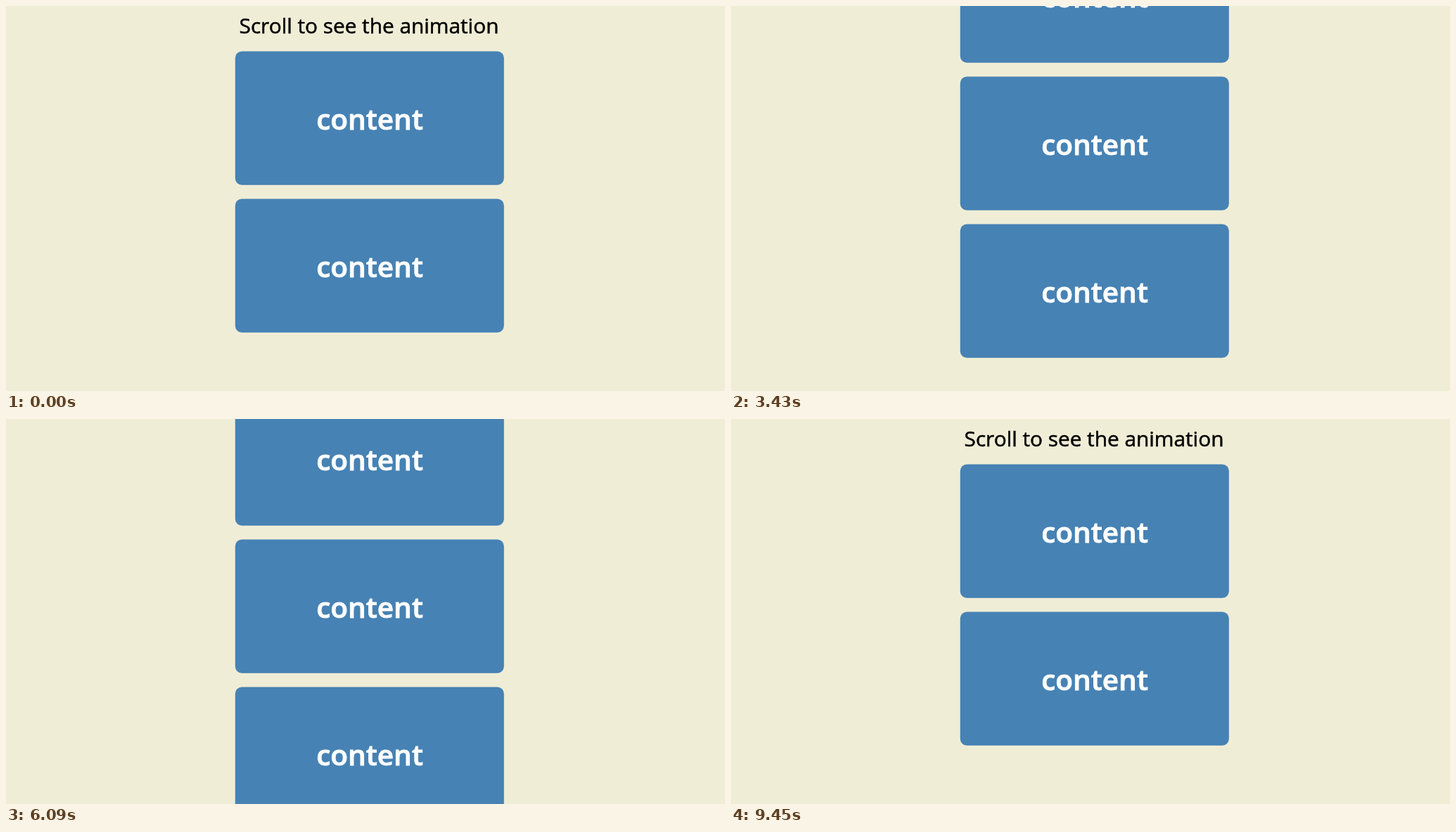
These frames come from a looping animation (1022 by 548 pixels, 9730 ms). An HTML page:

```html
<!DOCTYPE html>
<html lang="en">
<head>
<meta charset="utf-8">
<title>Scroll animation</title>
<style>
  html, body { margin: 0; width: 100%; height: 100%; overflow: hidden; background: #efedd6; }
  svg { display: block; width: 1022px; height: 548px; }
  text { font-family: "Open Sans", "Noto Sans", sans-serif; text-anchor: middle; }
  .title { font-size: 29.8px; fill: #000; stroke: #000; stroke-width: .5px; }
  .label { font-size: 40.6px; font-weight: 600; fill: #fff; stroke: #fff; stroke-width: .9px; }
  rect { fill: #4682b4; }
</style>
</head>
<body>
<svg viewBox="0 0 1022 548">
  <g id="page"><text class="title" x="516" y="39">Scroll to see the animation</text></g>
</svg>
<script>
const LOOP = 9730, STEP = 70, SLIDE = 400, LAG = 20;
const TRIGGER = 438.3, FIRST_TOP = 64.4, PITCH = 210, FAR = 1527;

// Each flick of the wheel glides to a new scroll position
const flicks = [
  { start: 740, end: 1080, to: 182 },
  { start: 1690, end: 2030, to: 390 },
  { start: 2505, end: 3383, to: 594 },
  { start: 3715, end: 4280, to: 910 },
  { start: 4290, end: 4900, to: 1140 },
  { start: 5186, end: 5508, to: 859 },
  { start: 5750, end: 6500, to: 511 },
  { start: 6790, end: 7600, to: 0 }
];

const clamp = x => Math.min(1, Math.max(0, x));
const glide = u => u ** 3 / (u ** 3 + (1 - u) ** 3);

function scrollAt(time) {
  let pos = 0, from = 0;
  for (const { start, end, to } of flicks) {
    pos += (to - from) * glide(clamp((time - start) / (end - start)));
    from = to;
  }
  return pos;
}

// CSS "ease": cubic-bezier(.25, .1, .25, 1)
function ease(x) {
  if (x >= 1) return 1;
  const bezier = (a, b, s) => 3 * (1 - s) ** 2 * s * a + 3 * (1 - s) * s * s * b + s ** 3;
  let lo = 0, hi = 1;
  for (let n = 0; n < 24; n++) {
    const mid = (lo + hi) / 2;
    if (bezier(.25, .25, mid) < x) lo = mid; else hi = mid;
  }
  return bezier(.1, 1, lo);
}

const page = document.getElementById("page");
function add(parent, tag, attrs = {}) {
  const node = document.createElementNS("http://www.w3.org/2000/svg", tag);
  for (const name in attrs) node.setAttribute(name, attrs[name]);
  return parent.appendChild(node);
}

const boxes = Array.from({ length: 10 }, (_, i) => {
  const top = FIRST_TOP + i * PITCH;
  const node = add(page, "g");
  add(node, "rect", { x: 325.8, y: top, width: 382, height: 190.4, rx: 9.5 });
  add(node, "text", { class: "label", x: 517, y: top + 111.6 }).textContent = "content";
  return { node, top, side: i % 2 ? -1 : 1, toggles: [] };
});

// A box slides in when its top passes the trigger line, and out again on the way back
const isShown = (box, t) => box.top - scrollAt(t - LAG) < TRIGGER;

for (const box of boxes) {
  let shown = box.startShown = isShown(box, 0);
  for (let t = 1; t < LOOP; t++) {
    if (isShown(box, t) !== shown) {
      shown = !shown;
      box.toggles.push({ t, shown });
    }
  }
}

function offsetOf(box, time) {
  let away = box.startShown ? 0 : 1;
  for (const { t, shown } of box.toggles) {
    if (t > time) break;
    const p = ease((time - t) / SLIDE);
    away = shown ? 1 - p : p;
  }
  return away * FAR * box.side;
}

function draw(now) {
  const time = Math.floor((now % LOOP) / STEP) * STEP;
  page.setAttribute("transform", `translate(0 ${-Math.round(scrollAt(time))})`);
  for (const box of boxes)
    box.node.setAttribute("transform", `translate(${offsetOf(box, time).toFixed(1)} 0)`);
}

const start = performance.now();
function tick() {
  draw(performance.now() - start);
  requestAnimationFrame(tick);
}
tick();
</script>
</body>
</html>
```
